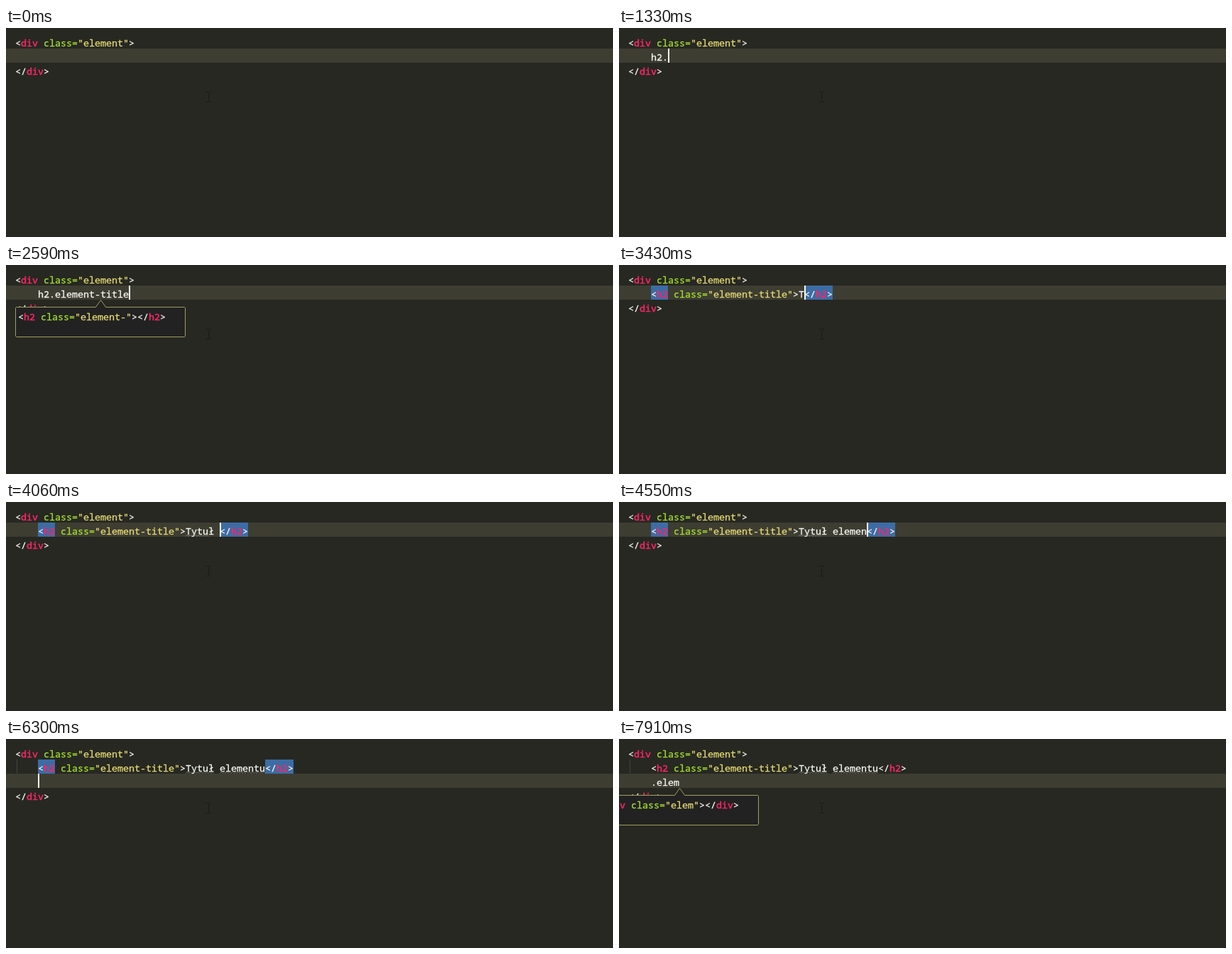
Recreate the animation shown at these times as an HTML page. Size 855 px wide and 295 px high, loop 8000 ms.

```html
<!DOCTYPE html>
<html lang="en">
<head>
<meta charset="utf-8">
<title>Abbreviation typing in a code editor</title>
<style>
  html, body { margin: 0; width: 100%; height: 100%; overflow: hidden; background: #272822; }
  svg { display: block; }
  text {
    font: 13.333px "Noto Sans Mono", "DejaVu Sans Mono", monospace;
    white-space: pre; stroke: currentColor; stroke-width: .3px; fill: currentColor;
  }
  .tag { color: #f92666; stroke-width: .5px; }
  .attr { color: #a6e22e; }
  .string { color: #e6db74; }
  .plain { color: #f8f8f2; }
</style>
</head>
<body>
<svg id="stage" width="855" height="295" viewBox="0 0 855 295"></svg>
<script>
const LOOP = 8000, STEP = 70, CELL = 8, ROW = 20, TOP = 9, LEFT = 13, INDENT = LEFT + 4 * CELL;
const EXPAND = 2870, SPELLCHECK = 3920, RECHECK = 4970, LINE_END = 5740, NEWLINE = 6300, UNMARK = 6440;

// Bursts of keys: start time, letters, and the gap between letters if it is not one step.
const ABBR = [[840, 'h'], [1190, '2.', 140], [1540, 'element'], [2240, '-title']];
const TITLE = [[3430, 'T'], [3570, 'ytu'], [3920, 'ł'], [4060, ' el'], [4340, 'emen'], [4690, 'tu']];
const NEXT = [[6860, '.'], [7000, 'elem']];
// The class name in the preview lags behind the keys.
const ABBR_HINT = [[1540, 'elem'], [2100, 'ent-'], [2660, 'title', 14]];
const NEXT_HINT = [[7000, 'el'], [7280, 'em']];

const typed = (bursts, t) => bursts.map(([start, letters, gap = STEP]) =>
  letters.slice(0, Math.max(0, Math.floor((t - start) / gap) + 1))).join('');
const rowY = row => TOP + row * ROW;
const escapeText = s => s.replace(/</g, '&lt;').replace(/>/g, '&gt;');
const element = (tag, name, body = '') => `<${tag} class="${name}">${body}</${tag}>`;
const rect = (x, y, w, h, fill) => `<rect x="${x}" y="${y}" width="${w}" height="${h}" fill="${fill}"/>`;

function code(source, x, baseline) {
  const tokens = source.matchAll(/(?<=<\/?)\w+|class=|"[^"]*"|<\/?|[^<>="\s]+|>/g);
  let out = '', before = '';
  for (const { 0: s, index } of tokens) {
    const kind = before.startsWith('<') ? 'tag' : s === 'class=' ? 'attr' : s[0] === '"' ? 'string' : 'plain';
    out += `<text class="${kind}" x="${x + index * CELL}" y="${baseline}">${escapeText(s)}</text>`;
    before = s;
  }
  return out;
}

const line = (source, row, x = LEFT) => code(source, x, rowY(row) + 17);

function popup(source, anchor, row) {
  const y = rowY(row) + 30.5, w = source.length * CELL + 31, x = anchor - w / 2;
  const h = source.length > 30 ? 57 : 42, tip = anchor + .5;
  return `<path d="M${x + 1} ${y}H${tip - 7}L${tip} ${y - 10}L${tip + 7} ${y}H${x + w - 1}` +
    `l1 1v${h - 2}l-1 1H${x + 1}l-1 -1v${2 - h}z" fill="#222222" stroke="#a09f60"/>` +
    code(source, Math.round(x + 3.4), y + 18.5);
}

function squiggle(x, chars, row) {
  return `<path d="M${x} ${rowY(row) + 19.5}${'l2 -2l2 2'.repeat(chars * 2)}"` +
    ' fill="none" stroke="#9c9c90" stroke-width=".7"/>';
}

function draw(t) {
  const expanded = t >= EXPAND, broken = t >= NEWLINE;
  const activeRow = broken ? 2 : 1;
  const abbr = typed(ABBR, t), title = typed(TITLE, t), next = typed(NEXT, t);
  const bodyX = INDENT + '<h2 class="element-title">'.length * CELL;
  const titleEnd = bodyX + title.length * CELL;

  let out = rect(0, 0, 855, 295, '#272822') + rect(0, rowY(activeRow), 855, ROW, '#3e3d32');
  if (broken) out += rect(15, rowY(1), 1, ROW, '#43443c');
  if (expanded && t < UNMARK) {
    out += rect(INDENT, rowY(1), 3 * CELL, ROW, '#3d6ca5');
    out += rect(titleEnd, rowY(1), 5 * CELL, ROW, '#3d6ca5');
  }

  out += line('<div class="element">', 0);
  out += line(expanded ? element('h2', 'element-title', title) : abbr, 1, INDENT);
  out += line('</div>', activeRow + 1);
  out += line(next, 2, INDENT);

  if (t >= RECHECK) out += squiggle(bodyX, 5, 1) + squiggle(bodyX + 6 * CELL, 8, 1);
  else if (t >= SPELLCHECK) out += squiggle(bodyX, 4, 1);

  const [tag, prefix, hint] = broken ? ['div', '.', typed(NEXT_HINT, t)] : ['h2', 'h2.', typed(ABBR_HINT, t)];
  if (hint && (broken || !expanded)) {
    out += popup(element(tag, hint), INDENT + (prefix + hint).length * CELL, activeRow);
  }

  const caretOff = t < 350 || (t >= 5600 && t < LINE_END) || t >= 7910;
  if (!caretOff) {
    const x = broken ? INDENT + next.length * CELL
      : !expanded ? INDENT + abbr.length * CELL
      : t >= LINE_END ? titleEnd + 5 * CELL : titleEnd;
    out += rect(x, rowY(activeRow), 2, ROW, '#f8f8f0');
  }

  // Resting mouse pointer
  out += '<path d="M282 90.5h2.5l1 1l1 -1h2.5M285.5 91v13M282 104.5h2.5l1 -1l1 1h2.5" fill="none" stroke="#191a15"/>';
  return out;
}

const stage = document.getElementById('stage');
let shown = '';
function tick(now) {
  const t = now % LOOP;
  const picture = draw(t - t % STEP);
  if (picture !== shown) stage.innerHTML = shown = picture;
  requestAnimationFrame(tick);
}
tick(0);
</script>
</body>
</html>
```
